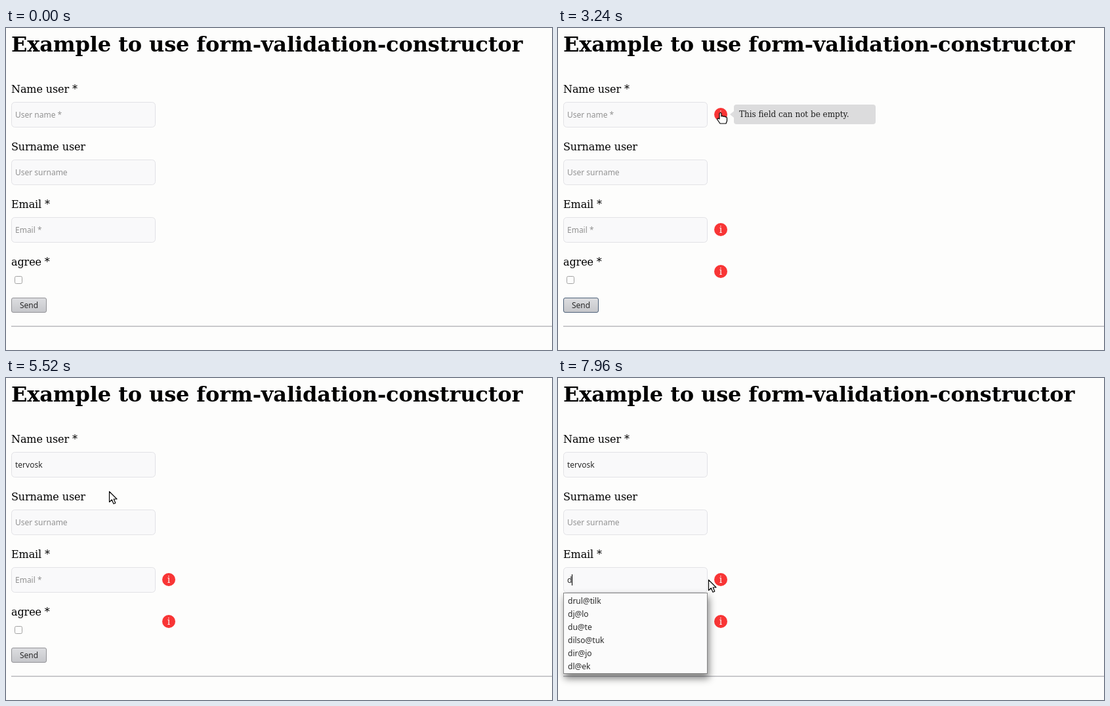
Recreate the animation shown at these times as an HTML page. Size 832 by 492 pixels, loop 8000 ms.

```html
<!DOCTYPE html>
<html lang="en">
<head>
<meta charset="utf-8">
<title>Form validation</title>
<style>
  html, body { margin: 0; width: 100%; height: 100%; overflow: hidden; background: #fdfdfc; }
  svg { display: block; width: 832px; height: 492px; }
  text { font: 12px "Noto Sans", sans-serif; fill: #2a2a2a; white-space: pre; }
  .title { font: bold 32px "DejaVu Serif", serif; letter-spacing: -.12px; fill: #000; }
  .label { font: 16px "DejaVu Serif", serif; letter-spacing: -.1px; fill: #000; }
  .tip { font: 12px "DejaVu Serif", serif; fill: #1c1c1c; }
  .mark { font: 14px "DejaVu Serif", serif; fill: #fdfdfc; text-anchor: middle; }
  .hint { fill: #929292; }
  .field { fill: #f9f9fa; stroke: #e2e2e6; }
  .pointer { fill: #fdfdfc; stroke: #000; stroke-width: 1.2; stroke-linejoin: round; }
</style>
</head>
<body>
<svg viewBox="0 0 832 492">
  <defs>
    <linearGradient id="idle" x2="0" y2="1">
      <stop stop-color="#dddee1"/><stop offset="1" stop-color="#c5c6ca"/>
    </linearGradient>
    <linearGradient id="hover" x2="0" y2="1">
      <stop stop-color="#ebecef"/><stop offset="1" stop-color="#d5d6da"/>
    </linearGradient>
    <filter id="blur" x="-20%" y="-200%" width="140%" height="500%">
      <feGaussianBlur stdDeviation="6"/>
    </filter>
    <clipPath id="reveal"><rect id="revealBox" x="8" y="328" width="220"/></clipPath>
  </defs>

  <text class="title" x="8" y="36">Example to use form-validation-constructor</text>
  <g id="form"></g>
  <rect x="13.5" y="379.5" width="11" height="11" rx="2" fill="#fdfdfc" stroke="#a2a2a2"/>
  <rect id="button" x="8.5" y="412.5" width="53" height="22" rx="2.5"/>
  <text x="21" y="428">Send</text>
  <path d="M8 455.5H832" stroke="#b6b6ba"/>
  <path d="M8 456.5H832" stroke="#dedee0"/>
  <g id="icons"></g>

  <g id="tooltip">
    <path d="M262 132l6-5v10z" fill="#dededf"/>
    <rect x="268" y="117" width="216" height="30" rx="4" fill="#dcdcdd"/>
    <text class="tip" x="276" y="136">This field can not be empty.</text>
  </g>

  <g id="popup">
    <rect id="shadow" x="10" y="334" width="220" fill="#000" filter="url(#blur)"/>
    <rect id="frame" x="8.5" y="328.5" width="219" fill="#fbfbfb" stroke="#868686"/>
    <g id="options" clip-path="url(#reveal)"></g>
  </g>
  <path id="caret" stroke="#000"/>

  <g id="cursor">
    <path id="arrow" class="pointer" d="M.5.5V16.5L4.3 13 7 19.2 9.8 18 7.2 12H12Z"/>
    <path id="hand" class="pointer" d="M-1 10V1.5Q.5-.5 2 1.5V6Q3.5 4.8 5 6.3 6.5 5.3 8 7 10.5 6.5 10.5 9V13L9 17H0L-4.5 10.5Q-3.5 8-1 10Z"/>
    <g id="beam" fill="none">
      <path d="M-3 -7H3M0 -7V7M-3 7H3" stroke="#000" stroke-width="4"/>
      <path d="M-2.4 -7H2.4M0 -7V7M-2.4 7H2.4" stroke="#fdfdfc" stroke-width="1.6"/>
    </g>
  </g>
</svg>

<script>
const LOOP = 8000;
const USER = "tervosk";
const OPTIONS = ["drul@tilk", "dj@lo", "du@te", "dilso@tuk", "dir@jo", "dl@ek"];
const FIELDS = [
  ["Name user *", "User name *", 113],
  ["Surname user", "User surname", 201],
  ["Email *", "Email *", 289]
];
// time, x, y, shape
const PATH = [
  [40, 786, 3, "arrow"], [840, 300, 250, "arrow"], [1360, 38, 422, "arrow"],
  [2680, 38, 422, "arrow"], [3040, 247, 129, "hand"], [3720, 247, 129, "hand"],
  [3900, 220, 130, "beam"], [4240, 174, 129, "beam"], [5360, 174, 129, "beam"],
  [5440, 166, 150, "arrow"], [5520, 157, 173, "arrow"], [5720, 152, 210, "beam"],
  [5840, 149, 250, "arrow"], [6000, 146, 300, "beam"], [6160, 144, 304, "beam"],
  [6900, 144, 304, "beam"], [7000, 143, 291, "arrow"], [7280, 143, 291, "arrow"],
  [7960, 229, 308, "arrow"]
];

const $ = id => document.getElementById(id);
const clamp = v => Math.max(0, Math.min(1, v));
const ramp = (t, from, to) => clamp((t - from) / (to - from));
const mix = (a, b, k) => a + (b - a) * k;
const within = (t, from, to) => t >= from && t < to;

function add(parent, tag, attrs, text = "") {
  const node = document.createElementNS("http://www.w3.org/2000/svg", tag);
  for (const key in attrs) node.setAttribute(key, attrs[key]);
  node.textContent = text;
  return parent.appendChild(node);
}
function set(id, attrs) {
  for (const key in attrs) $(id).setAttribute(key, attrs[key]);
}
function show(id, on) {
  $(id).style.display = on ? "" : "none";
}

const inputs = FIELDS.map(([label, hint, y]) => {
  add($("form"), "text", { class: "label", x: 8, y: y - 14 }, label);
  add($("form"), "rect", { class: "field", x: 8.5, y: y + .5, width: 219, height: 38, rx: 5 });
  return { hint, node: add($("form"), "text", { x: 14, y: y + 24 }) };
});
add($("form"), "text", { class: "label", x: 8, y: 363 }, "agree *");

const icons = [132, 308, 372].map(y => {
  const icon = add($("icons"), "g", {});
  add(icon, "circle", { cx: 248, cy: y, r: 10, fill: "#f83535" });
  add(icon, "text", { class: "mark", x: 248, y: y + 5 }, "i");
  return icon;
});
OPTIONS.forEach((name, i) => add($("options"), "text", { x: 15, y: 345 + 20 * i }, name));

function fill(input, value) {
  input.node.textContent = value || input.hint;
  input.node.setAttribute("class", value ? "" : "hint");
  return value ? input.node.getComputedTextLength() : 0;
}

function drawCursor(t) {
  show("cursor", t >= PATH[0][0]);
  const next = PATH.findIndex(step => step[0] > t);
  const b = PATH.at(next);
  const a = next > 0 ? PATH[next - 1] : b;
  const k = a === b ? 0 : ramp(t, a[0], b[0]);
  const x = Math.round(mix(a[1], b[1], k)), y = Math.round(mix(a[2], b[2], k));
  set("cursor", { transform: `translate(${x} ${y})` });
  for (const shape of ["arrow", "hand", "beam"]) show(shape, shape === a[3]);
}

function drawPopup(t) {
  show("popup", t >= 7020);
  const open = 1 - (1 - ramp(t, 7070, 7300)) ** 2;
  const height = mix(4, 124, open);
  set("frame", { height: height - 1 });
  set("revealBox", { height: height - 2 });
  set("shadow", { height: height + 1, opacity: mix(.25, .5, open) });
}

function render(t) {
  const typed = t < 4560 ? 0 : Math.min(USER.length, 1 + Math.floor((t - 4560) / 65));
  const nameWidth = fill(inputs[0], USER.slice(0, typed));
  fill(inputs[1], "");
  const mailWidth = fill(inputs[2], t >= 6960 ? "d" : "");

  const inName = within(t, 4360, 5440), inMail = t >= 6200;
  show("caret", inName || inMail);
  const caretX = Math.floor(14 + (inMail ? mailWidth : nameWidth)) + .5;
  set("caret", { d: `M${caretX} ${inMail ? 300 : 124}v17` });

  set("button", {
    fill: `url(#${within(t, 1320, 2740) ? "hover" : "idle"})`,
    stroke: within(t, 1880, 4360) ? "#4c6078" : "#929296"
  });

  const shown = ramp(t, 1920, 2600);
  icons.forEach((icon, i) =>
    icon.setAttribute("opacity", i ? shown : shown * (1 - ramp(t, 4600, 5000))));
  $("tooltip").setAttribute("opacity", ramp(t, 2980, 3240) * (1 - ramp(t, 3800, 4320)));

  drawPopup(t);
  drawCursor(t);
}

const start = performance.now();
function tick() {
  render((performance.now() - start) % LOOP);
  requestAnimationFrame(tick);
}
tick();
</script>
</body>
</html>
```
